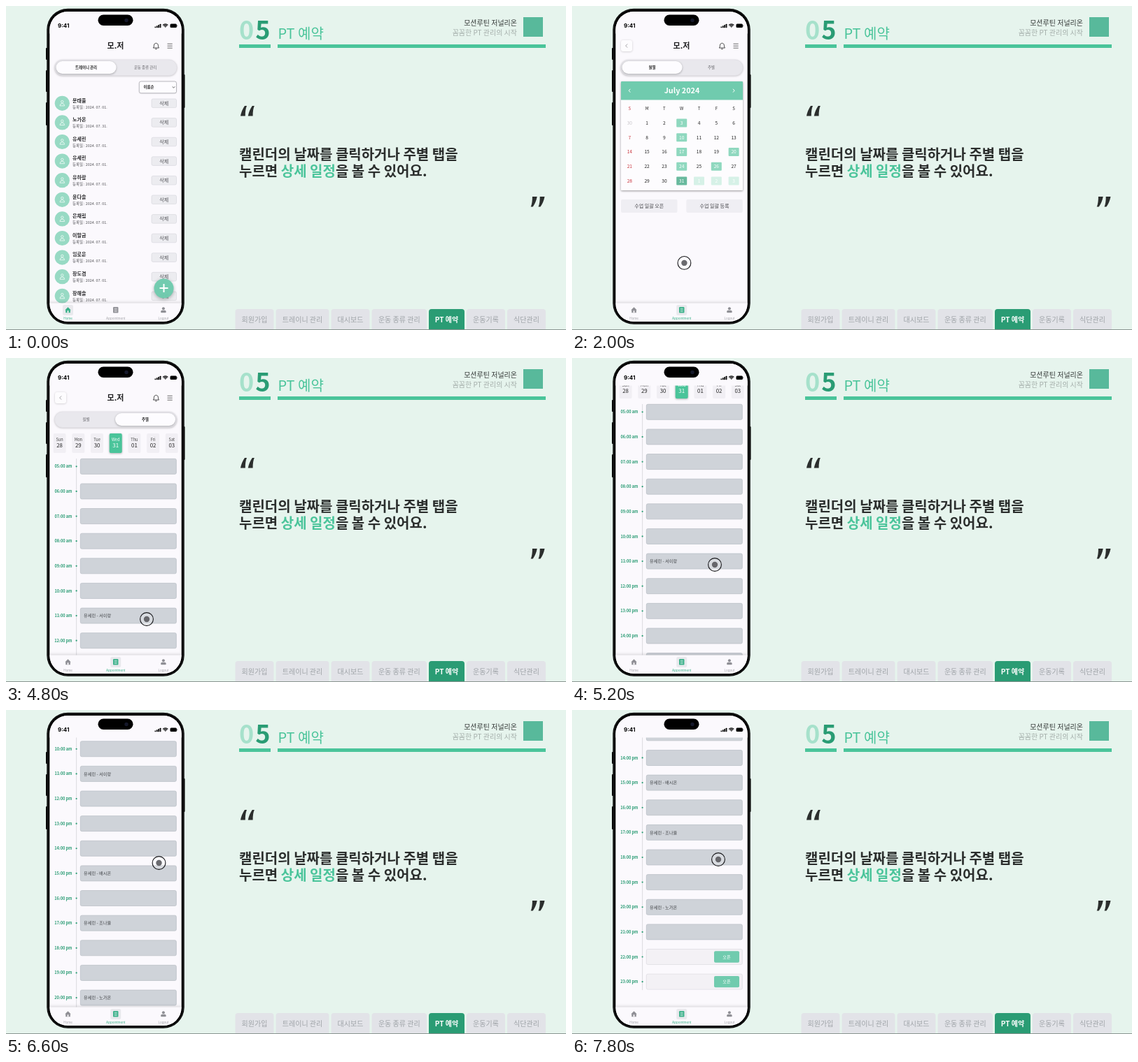
Animation of 800x464 px, one loop 8000 ms. Source, as an HTML page with a canvas:

```html
<!DOCTYPE html>
<html lang="ko">
<head>
<meta charset="utf-8">
<title>PT 예약</title>
<style>
html, body { margin: 0; width: 100%; height: 100%; overflow: hidden; background: #e6f4ed; }
canvas { display: block; width: 800px; height: 464px; }
</style>
</head>
<body>
<canvas id="stage"></canvas>
<script>
const LOOP = 8000, STEP = 200;
const KR = '"Noto Sans CJK KR", "Noto Sans CJK", sans-serif';
const LATIN = 'Inter, Roboto, sans-serif';
const GREEN = '#4ac49a', DEEP = '#2a9c74', MINT = '#70cbae', SCREEN = '#fbf9fd', INK = '#2b2e2d';

const canvas = document.getElementById('stage');
const g = canvas.getContext('2d');
const ratio = window.devicePixelRatio || 1;
canvas.width = 800 * ratio;
canvas.height = 464 * ratio;

// Timeline: [ms, values...]
const pointerKeys = [
  [600, 185, 410], [1000, 161, 442.5], [1400, 161, 442.5], [2800, 159.5, 253],
  [3400, 159.5, 253], [4600, 201, 374], [4800, 201, 374], [5600, 207, 218],
  [6000, 206.5, 344], [6600, 218.5, 219], [7000, 210, 344], [7600, 209, 214], [8000, 209, 214]
];
const scrollKeys = [[4800, 0], [5600, 156], [6000, 156], [6600, 277.7], [7000, 277.7], [7600, 407.5]];

function track(keys, t) {
  if (t <= keys[0][0]) return keys[0].slice(1);
  for (let i = 1; i < keys.length; i++) {
    const a = keys[i - 1], b = keys[i];
    if (t <= b[0]) {
      const u = (t - a[0]) / (b[0] - a[0]), e = u * u * (3 - 2 * u);
      return a.slice(1).map((v, k) => v + (b[k + 1] - v) * e);
    }
  }
  return keys[keys.length - 1].slice(1);
}

// Drawing helpers
function box(x, y, w, h, r, fill, stroke, lw = 0.6) {
  g.beginPath();
  g.roundRect(x, y, w, h, r);
  if (fill) { g.fillStyle = fill; g.fill(); }
  if (stroke) { g.strokeStyle = stroke; g.lineWidth = lw; g.stroke(); }
}

function disc(x, y, r, fill, stroke, lw = 1) {
  g.beginPath();
  g.arc(x, y, r, 0, Math.PI * 2);
  if (fill) { g.fillStyle = fill; g.fill(); }
  if (stroke) { g.strokeStyle = stroke; g.lineWidth = lw; g.stroke(); }
}

function line(points, color, lw) {
  g.beginPath();
  points.forEach(([x, y], i) => i ? g.lineTo(x, y) : g.moveTo(x, y));
  g.strokeStyle = color;
  g.lineWidth = lw;
  g.stroke();
}

// y is the visual middle of the line
function text(s, x, y, size, color = INK, weight = 400, align = 'left', font = KR) {
  g.font = `${weight} ${size}px ${font}`;
  g.textAlign = align;
  g.fillStyle = color;
  g.fillText(s, x, y + size * 0.37);
}
const middle = (s, x, y, size, color, weight, font) => text(s, x, y, size, color, weight, 'center', font);

function shadowed(color, blur, dy, draw) {
  g.save();
  g.shadowColor = color;
  g.shadowBlur = blur * ratio;
  g.shadowOffsetY = dy * ratio;
  draw();
  g.restore();
}

// Right-hand slide
function quote(x, y, flip) {
  g.save();
  g.translate(x, y);
  if (flip) g.rotate(Math.PI);
  g.fillStyle = INK;
  for (const dx of [-10, 0.8]) {
    g.beginPath();
    g.moveTo(dx + 6, -7.5);
    g.lineTo(dx + 9, -7.5);
    g.quadraticCurveTo(dx + 6.6, -2, dx + 6.8, 7);
    g.lineTo(dx, 7);
    g.quadraticCurveTo(dx + 1.5, -1, dx + 6, -7.5);
    g.fill();
  }
  g.restore();
}

const tabs = [
  ['회원가입', 327.5, 382.5], ['트레이니 관리', 385.5, 461.5], ['대시보드', 464.5, 519.5],
  ['운동 종류 관리', 522.5, 601], ['PT 예약', 604, 655], ['운동기록', 658, 713], ['식단관리', 716, 771]
];

function slide() {
  g.fillStyle = '#e6f4ed';
  g.fillRect(0, 0, 800, 464);

  text('0', 333, 35, 36, '#a6e1cb', 900);
  text('5', 377.5, 35, 36, DEEP, 900, 'right');
  text('PT 예약', 388.5, 39.5, 20, GREEN, 400);
  g.fillStyle = GREEN;
  g.fillRect(333, 55, 45, 5);
  g.fillRect(388, 55, 383, 5);

  text('모션루틴 저널리온', 730, 24, 10, '#343837', 500, 'right');
  text('꼼꼼한 PT 관리의 시작', 730, 38, 10, '#a4aeaa', 400, 'right');
  g.fillStyle = '#58b99b';
  g.fillRect(739, 16, 28, 28);

  quote(345, 150.5);
  quote(759.5, 280, true);
  text('캘린더의 날짜를 클릭하거나 주별 탭을', 333, 213, 20, INK, 700);
  let x = 333;
  for (const [s, color] of [['누르면 ', INK], ['상세 일정', GREEN], ['을 볼 수 있어요.', INK]]) {
    text(s, x, 236.5, 20, color, 700);
    x += g.measureText(s).width;
  }

  tabs.forEach(([label, a, b], i) => {
    const on = i === 4;
    box(a, 434, b - a, 30, [4, 4, 0, 0], on ? DEEP : '#e2e3e8');
    middle(label, (a + b) / 2, 449, 10, on ? '#fff' : '#9ea3a7', on ? 700 : 500);
  });
  g.fillStyle = '#8b9591';
  g.fillRect(0, 463, 800, 1);
}

// Phone
function body() {
  for (const [x, y, h] of [[57, 60, 17], [57, 92, 31], [57, 138, 33], [252.5, 98, 48]])
    box(x, y, 3, h, 1, '#000');
  box(58.3, 3.7, 196.4, 452, 30, '#000');
  box(59.4, 4.8, 194.2, 449.8, 29, null, '#3a3a3d', 0.5);
  box(62.3, 8, 188.4, 444, 26, SCREEN);
}

function statusBar() {
  g.fillStyle = SCREEN;
  g.fillRect(62, 8, 189, 31.5);
  box(131.5, 12.5, 50, 15.5, 7.75, '#000');
  disc(172, 20.5, 2.7, '#15182a');
  text('9:41', 74, 28, 8, '#000', 700, 'left', LATIN);
  for (let i = 0; i < 4; i++) box(212.5 + i * 2.4, 29.4 - i * 1.2, 1.7, 1.8 + i * 1.2, 0.4, '#000');
  for (const r of [1.4, 3.4, 5.2]) {
    g.beginPath();
    g.arc(227.7, 31, r, -Math.PI * 0.75, -Math.PI * 0.25);
    g.strokeStyle = '#000';
    g.lineWidth = 1.2;
    g.stroke();
  }
  box(234.5, 25.6, 9.4, 5.4, 1.5, '#000');
  box(244.4, 27.3, 0.8, 2, 0.4, '#555');
}

function header(back) {
  if (back) {
    shadowed('rgba(0,0,0,.2)', 3, 0.6, () => box(70, 49, 16, 16, 3, '#fdfcfe'));
    line([[79.2, 54.4], [76.6, 57], [79.2, 59.6]], '#8c8c92', 0.8);
  }
  middle('모.저', 156.5, 57, 11, '#1d1d1f', 700);
  g.beginPath();
  g.moveTo(210.3, 60);
  g.quadraticCurveTo(211.5, 59, 211.4, 56.5);
  g.bezierCurveTo(211.4, 52.2, 217.4, 52.2, 217.4, 56.5);
  g.quadraticCurveTo(217.3, 59, 218.5, 60);
  g.closePath();
  g.strokeStyle = '#333';
  g.lineWidth = 0.9;
  g.stroke();
  line([[213.2, 61.7], [215.6, 61.7]], '#333', 0.9);
  for (const y of [54.2, 57.2, 60.2]) line([[230.5, y], [237.7, y]], '#444', 0.8);
}

function segment(left, right, active) {
  shadowed('rgba(0,0,0,.25)', 3, 0.8, () => box(69.5, 77, 174.5, 22.5, 11.2, '#e9e8ed'));
  box(69.5, 77, 174.5, 22.5, 11.2, '#e9e8ed', '#dcdbe0', 0.5);
  shadowed('rgba(0,0,0,.3)', 3, 0.8, () => box(active ? 156 : 71.5, 79, 86, 18, 9, '#fdfcff'));
  middle(left, 114.5, 88, 5.4, active ? '#66666b' : '#222', active ? 500 : 700);
  middle(right, 199, 88, 5.4, active ? '#222' : '#66666b', active ? 700 : 500);
}

function navBar(active) {
  shadowed('rgba(0,0,0,.16)', 4, -1, () => box(62.3, 425.5, 188.4, 26.5, [0, 0, 25, 25], SCREEN));
  ['Home', 'Appointment', 'Logout'].forEach((label, i) => {
    const x = 88.5 + i * 68.2, on = i === active, c = on ? '#38b088' : '#8f8f95';
    if (on) box(x - 7.5, 428, 15, 15, 2.5, '#e9e9ed');
    if (i === 0) {
      g.fillStyle = c;
      g.beginPath();
      g.moveTo(x - 4.2, 435.4);
      g.lineTo(x, 431.2);
      g.lineTo(x + 4.2, 435.4);
      g.lineTo(x + 3.3, 435.6);
      g.lineTo(x + 3.3, 439.3);
      g.lineTo(x - 3.3, 439.3);
      g.lineTo(x - 3.3, 435.6);
      g.fill();
      box(x - 0.9, 436.3, 1.8, 3, 0, SCREEN);
    } else if (i === 1) {
      box(x - 3.7, 431, 7.4, 8.6, 1.2, c);
      for (const y of [433.2, 435.3, 437.4]) line([[x - 2, y], [x + 2, y]], SCREEN, 0.7);
    } else {
      disc(x, 433.3, 2, c);
      box(x - 3.8, 435.8, 7.6, 3.5, [2, 2, 1, 1], c);
    }
    middle(label, x, 447, 4.5, on ? '#38b088' : '#a3a3a8', 400, LATIN);
  });
}

// Home
const members = ['문태율', '노가온', '유세린', '유세린', '유하람', '윤다솔', '은채림', '이말금', '임로운', '장도겸', '장해솔'];

function home() {
  header(false);
  segment('트레이니 관리', '운동 종류 관리', 0);
  shadowed('rgba(0,0,0,.15)', 2, 0.5, () => box(190.3, 108, 53.2, 16.8, 2.5, '#fdfcff'));
  box(190.3, 108, 53.2, 16.8, 2.5, null, '#8f8f96', 0.6);
  text('이름순', 196.5, 116.3, 5.4, '#222', 700);
  line([[237.7, 115.4], [239.5, 117.2], [241.3, 115.4]], '#333', 0.8);

  members.forEach((name, i) => {
    const y = 139.3 + i * 27.6;
    disc(80.3, y, 10.6, '#98dac4');
    disc(80.3, y - 2.2, 1.7, null, '#f3fbf8', 0.8);
    g.beginPath();
    g.arc(80.3, y + 3.6, 3.3, Math.PI, 0);
    g.closePath();
    g.stroke();
    text(name, 95, y - 4.2, 7, '#2a2a2c', 700);
    text(`등록일 : 2024. 07. ${i === 1 ? 31 : '01'}.`, 95, y + 5.4, 5.4, '#555559');
    box(208, y - 6.3, 35.5, 12.6, 2, '#ececf0', '#d4d4da', 0.6);
    middle('삭제', 225.7, y, 7, '#55555a');
  });

  shadowed('rgba(0,0,0,.3)', 5, 1.5, () => disc(225.5, 404.5, 14, 'rgba(112,205,175,.96)'));
  line([[219.5, 404], [231.5, 404]], '#fff', 2);
  line([[225.5, 398], [225.5, 410]], '#fff', 2);
}

// Month
const booked = new Set([3, 10, 17, 20, 24, 26, 31]);

function month() {
  header(true);
  segment('월별', '주별', 0);
  shadowed('rgba(0,0,0,.4)', 3, 1, () => box(70, 108, 174, 156, 1, '#fdfcfe'));
  box(70, 108, 174, 26.5, [1, 1, 0, 0], MINT);
  middle('July 2024', 157, 121, 10.8, '#fff', 700);
  line([[83.3, 118.8], [81.2, 121.2], [83.3, 123.6]], '#fff', 1);
  line([[230, 118.8], [232.1, 121.2], [230, 123.6]], '#fff', 1);

  const colX = c => 82.3 + c * 24.8;
  [...'SMTWTFS'].forEach((d, c) => middle(d, colX(c), 146.7, 6, c ? '#222' : '#c8333c', 500));
  for (let i = 0; i < 35; i++) {
    const col = i % 7, x = colX(col), y = 167.5 + Math.floor(i / 7) * 20.75;
    const next = i > 31, prev = i === 0;
    const day = prev ? 30 : next ? i - 31 : i;
    const marked = next || (!prev && booked.has(day));
    if (marked) box(x - 7.5, y - 6, 15, 12, 1, next ? '#d6f1e7' : day === 31 ? '#68b99d' : '#8fd8bf');
    const color = marked ? '#fff' : prev ? '#c9c5ca' : col ? '#222' : '#c8333c';
    middle(String(day), x, y, 6.6, color, 500);
  }

  ['수업 일괄 오픈', '수업 일괄 등록'].forEach((s, i) => {
    const x = 70 + i * 93.3;
    box(x, 277, 80.5, 19, 2, '#efeef3');
    middle(s, x + 40.2, 286.3, 7, '#4a4a4e');
  });
}

// Week
const days = ['Sun', 'Mon', 'Tue', 'Wed', 'Thu', 'Fri', 'Sat'];
const lessons = { 11: '서이랑', 15: '배시온', 17: '조나율', 20: '노가온' };
const two = n => String(n).padStart(2, '0');

function week(scroll) {
  g.save();
  g.translate(0, -scroll);
  header(true);
  segment('월별', '주별', 1);
  days.forEach((d, i) => {
    const x = 76.6 + i * 26.7, on = i === 3;
    const card = () => box(x - 9, 108, 18, 28, 2, on ? GREEN : '#f1eff4');
    if (on) shadowed('rgba(0,0,0,.3)', 3, 1, card);
    else card();
    middle(d, x, 117, 5.6, on ? '#fff' : '#444', 400);
    middle(two((27 + i) % 31 + 1), x, 125, 7.8, on ? '#fff' : '#222', 500);
  });

  const rowY = h => 155.3 + (h - 5) * 35.63;
  line([[100.6, 144], [100.6, rowY(23) + 12]], '#d3d2d8', 0.8);
  for (let h = 5; h < 24; h++) {
    const y = rowY(h), open = h > 21;
    text(`${two(h)}:00 ${h < 12 ? 'am' : 'pm'}`, 94.5, y, 5.6, DEEP, 700, 'right');
    disc(100.6, y, 1.1, DEEP);
    box(106.3, y - 11, 137, 22, 2, open ? '#f3f1f5' : '#cfd3d9', open ? '#dcdae0' : '#b7bcc3', 0.7);
    if (lessons[h]) text(`유세린 - ${lessons[h]}`, 111, y, 6.2, '#404347', 500);
    if (open) {
      box(203, y - 8.2, 36, 16.4, 2, MINT);
      middle('오픈', 221, y, 6.2, '#fff', 500);
    }
  }
  g.restore();
}

function pointer(t) {
  if (t < 600) return;
  const [x, y] = track(pointerKeys, t);
  disc(x, y, 9.4, 'rgba(255,255,255,.2)', '#17171a', 1.1);
  disc(x, y, 4.2, 'rgba(85,85,90,.88)');
}

function draw(t) {
  g.setTransform(ratio, 0, 0, ratio, 0, 0);
  slide();
  body();
  g.save();
  g.beginPath();
  g.roundRect(62.3, 8, 188.4, 444, 26);
  g.clip();
  if (t < 1200) home();
  else if (t < 3400) month();
  else week(track(scrollKeys, t)[0]);
  statusBar();
  navBar(t < 1200 ? 0 : 1);
  g.restore();
  pointer(t);
}

const start = performance.now();
function tick() {
  const t = (performance.now() - start) % LOOP;
  draw(Math.floor(t / STEP) * STEP);
  requestAnimationFrame(tick);
}
tick();
</script>
</body>
</html>
```
